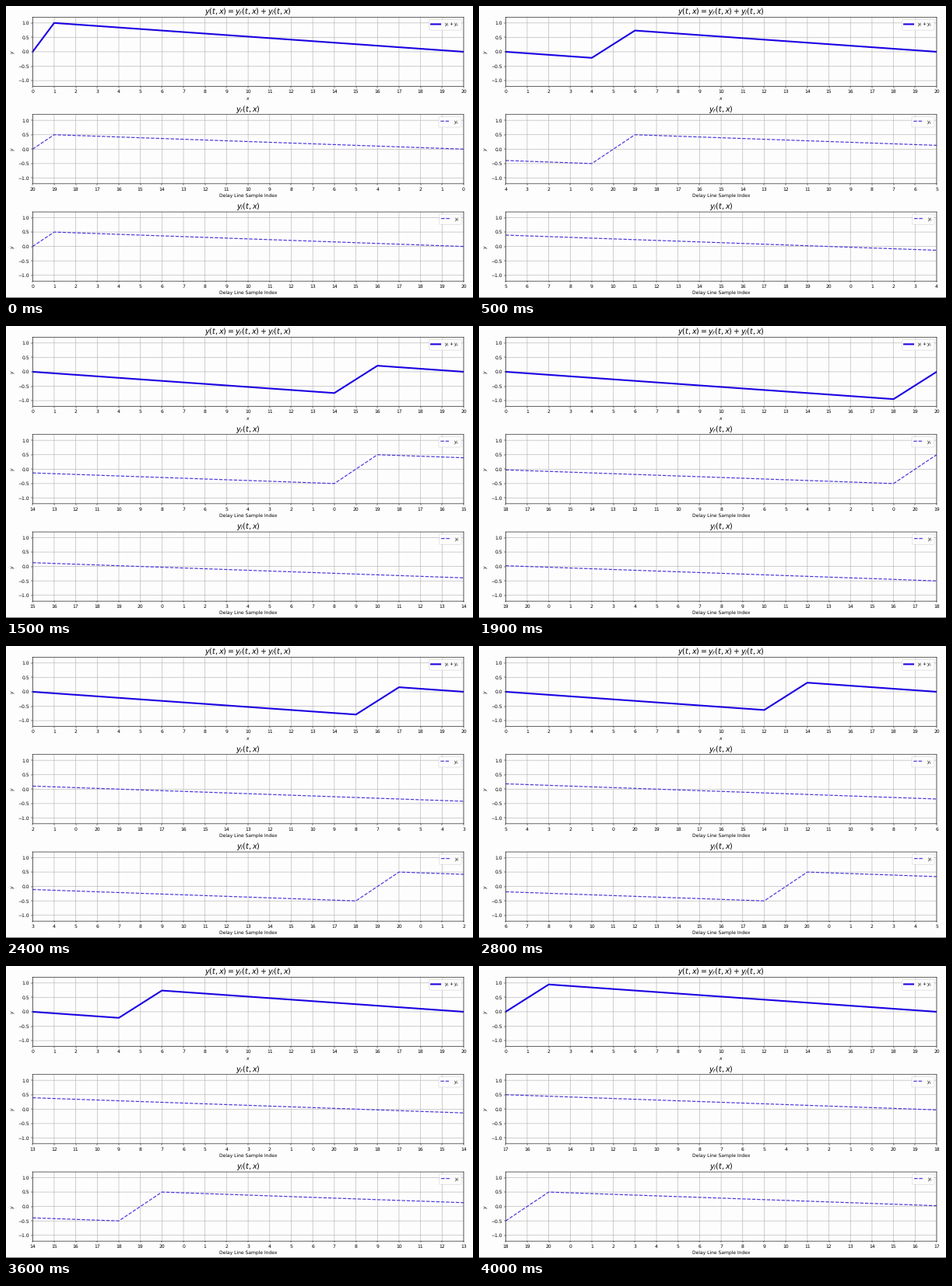
These frames come from a looping animation (600x376 px, 4.1 s). A matplotlib script:

```python
import numpy as np
import matplotlib.pyplot as plt
from matplotlib.animation import FuncAnimation
from matplotlib.lines import Line2D

W, H, DPI = 600, 376, 72
N = 20             # string length in samples
FRAMES, INTERVAL = 41, 100
HOLD = 28          # the wave rests for one step here
S = W / (14 * DPI)  # a 14 inch wide layout shrunk to the stage
PAPER = "#fefdfe"

plt.rcParams.update({
    "font.family": "DejaVu Sans",
    "font.size": 10 * S,
    "text.hinting": "none",
    "mathtext.fontset": "dejavusans",
    "path.snap": False,
    "axes.titlesize": 16 * S,
    "axes.titlepad": 5 * S,
    "axes.labelpad": 4 * S,
    "axes.linewidth": 1.0 * S,
    "axes.facecolor": PAPER,
    "figure.facecolor": PAPER,
    "grid.color": "#b0b0b0",
    "grid.linewidth": 1.0 * S,
    "xtick.major.size": 3.5 * S,
    "ytick.major.size": 3.5 * S,
    "xtick.major.width": 0.8 * S,
    "ytick.major.width": 0.8 * S,
    "xtick.major.pad": 3.5 * S,
    "ytick.major.pad": 3.5 * S,
    "patch.linewidth": 1.0 * S,
})

x = np.arange(N + 1)


def pluck(u):
    """Odd, 2N-periodic extension of half a string plucked at sample 1."""
    u = (np.asarray(u) + N) % (2 * N) - N
    a = np.abs(u)
    return np.sign(u) * 0.5 * np.minimum(a, (N - a) / (N - 1))


def add_panel(row, title, xlabel, label, **style):
    left, right, height = 34.2, 588, 89.1
    bottom = 103.5 + 125.35 * row
    ax = fig.add_axes([left / W, 1 - bottom / H,
                       (right - left) / W, height / H])
    ax.set(xlim=(0, N), ylim=(-1.2, 1.2), title=title,
           xlabel=xlabel, ylabel="$y$")
    ax.set_xticks(x, [str(i) for i in x])
    ax.set_yticks(np.arange(-1, 1.1, 0.5))
    ax.grid(True)
    line, = ax.plot(x, 0 * x, label=label, **style)
    ax.legend(loc="upper right")
    return ax, line


fig = plt.figure(figsize=(W / DPI, H / DPI), dpi=DPI)
index_label = "Delay Line Sample Index"
solid = dict(color="#1a00e2", lw=3.5 * S)
dashed = dict(color="#4636dc", lw=2 * S, ls="--")

_, total = add_panel(0, "$y(t,x) = y_r(t,x) + y_l(t,x)$", "$x$",
                     "$y_l + y_r$", **solid)
ax_r, right = add_panel(1, "$y_r(t,x)$", index_label, "$y_r$", **dashed)
ax_l, left = add_panel(2, "$y_l(t,x)$", index_label, "$y_l$", **dashed)

# thin rule along the bottom edge
fig.add_artist(Line2D([0, 1], [0.5 / H] * 2, color="#808080", lw=1))


def update(frame):
    t = frame - (frame >= HOLD)
    yr, yl = pluck(x - t), pluck(x + t)
    total.set_ydata(yr + yl)
    right.set_ydata(yr)
    left.set_ydata(yl)
    ax_r.set_xticklabels([str(i) for i in (N - x + t) % (N + 1)])
    ax_l.set_xticklabels([str(i) for i in (x + t) % (N + 1)])
    return total, right, left


anim = FuncAnimation(fig, update, frames=FRAMES, interval=INTERVAL,
                     repeat=True, repeat_delay=0, blit=False)
plt.show()
```
